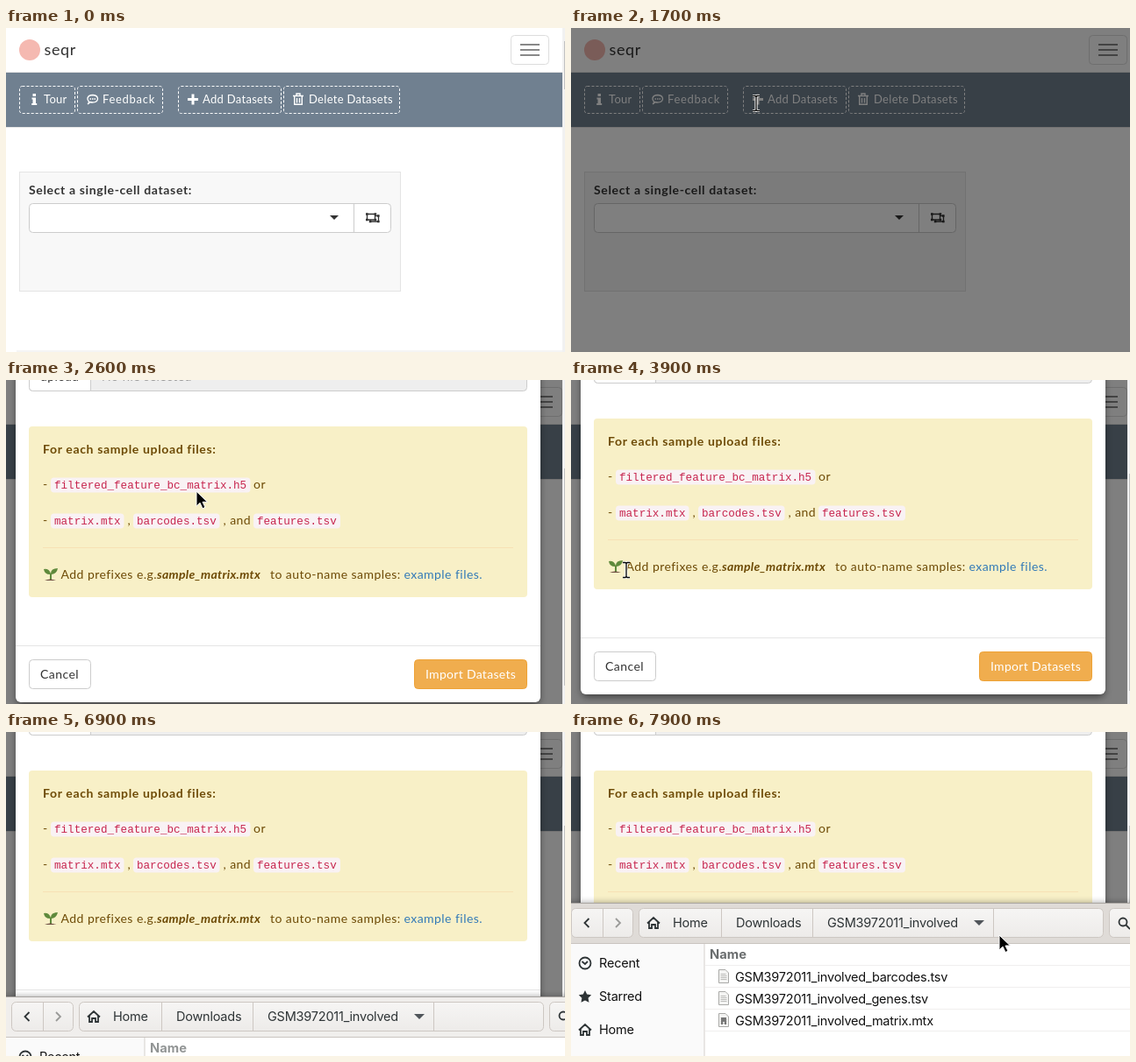
An HTML page for the animation above (8 s loop, 637x370 px).

```html
<!DOCTYPE html>
<html lang="en">
<head>
<meta charset="utf-8">
<title>Dataset upload</title>
<style>
  html, body { margin: 0; width: 100%; height: 100%; overflow: hidden; background: #fff; }
  svg { display: block; width: 637px; height: 370px; }
  text { font: 14px Lato, sans-serif; letter-spacing: .45px; fill: #333; white-space: pre; }
  .nav text { font-size: 13px; letter-spacing: .3px; fill: #fff; }
  .nav rect { fill: none; stroke: #fff; stroke-dasharray: 3 2; }
  .nav .ico { fill: #fff; }
  .line { fill: none; stroke: #fff; stroke-width: 1.4; }
  .ink { fill: none; stroke: #2e3436; stroke-width: 1.8; }
  text.big { font-size: 18px; letter-spacing: .65px; }
  text.bold { font-weight: 700; letter-spacing: .65px; }
  .box { fill: #fff; stroke: #ccc; }
  .note text { fill: #6d4a05; }
  .note .code { fill: #c7254e; font: 12.6px "Liberation Mono", monospace; letter-spacing: 0; }
  .note .tag { fill: #f9f2f4; }
  .note .link { fill: #337ab7; }
  #prefix text { fill: inherit; }
  #prefix .em { font-weight: 700; font-style: italic; letter-spacing: .3px; }
  .win text { font: 14.5px Inter, sans-serif; letter-spacing: -.22px; fill: #2e3436; }
  .win .files text { fill: #111; }
  .win text.col { font-weight: 700; font-size: 14.7px; letter-spacing: 0; }
  .win .btn { fill: url(#head); stroke: #cdc7c2; }
  .ptr path { stroke-linejoin: round; }
</style>
</head>
<body>
<svg viewBox="0 0 637 370">
  <defs>
    <linearGradient id="head" x1="0" y1="0" x2="0" y2="1">
      <stop offset="0" stop-color="#f6f5f4"/><stop offset="1" stop-color="#edebe9"/>
    </linearGradient>
    <filter id="soft" x="-10%" y="-10%" width="120%" height="120%">
      <feGaussianBlur stdDeviation="4"/>
    </filter>
    <clipPath id="sel"><rect id="selClip" x="63" y="332" width="0" height="20"/></clipPath>
    <g id="prefix">
      <text x="62.500" y="347">Add prefixes e.g.</text>
      <text class="em" x="172" y="347">sample_matrix.mtx</text>
      <text x="301" y="347">to auto-name samples:</text>
    </g>
    <g id="sheet">
      <path d="M.5 .500H8l3.500 3.500V15.500H.5z" fill="#f4f4f3" stroke="#a9a9a7"/>
      <path d="M2.500 5.500h6M2.500 7.500h7M2.500 9.500h7M2.500 11.500h7" stroke="#bcbcba"/>
    </g>
    <path id="house" class="ink" d="M-7 .5L0-6 7 .5M-5-1V6H-2V2H2V6H5V-1"/>
  </defs>

  <!-- page -->
  <rect width="637" height="370" fill="#fff"/>
  <circle cx="27" cy="25" r="12" fill="#f5b9b1"/>
  <text class="big" x="43.500" y="31">seqr</text>
  <g id="menu">
    <rect x="575.500" y="8.500" width="43" height="33" rx="4" fill="#fff" stroke="#ddd"/>
    <path d="M586 19h22M586 25h22M586 31h22" stroke="#888" stroke-width="2"/>
  </g>
  <path d="M0 50.500H637" stroke="#e7e7e7"/>
  <rect y="51" width="637" height="62" fill="#708090"/>
  <path d="M0 113.500H637" stroke="#e7e7e7"/>
  <g class="nav">
    <rect id="hover" x="196.500" y="66.500" width="117" height="31" rx="3" style="fill:#fff;fill-opacity:.15;stroke:none"/>
    <rect x="15.500" y="66.500" width="63" height="31" rx="3"/>
    <rect x="81.500" y="66.500" width="97" height="31" rx="3"/>
    <rect x="196.500" y="66.500" width="117" height="31" rx="3"/>
    <rect x="316.500" y="66.500" width="132" height="31" rx="3"/>
    <path class="ico" d="M30.500 75h3.500v3h-3.500zM29.500 79.500H34V86h1.200v2h-6v-2h1.300v-4.500h-1zM211.500 75.500h3v4.500h4.500v3h-4.500v4.500h-3V83H207v-3h4.500z"/>
    <path class="line" d="M93 87q2-1.500 1.500-3-2-2-1.500-4 1-3.500 6-3.500 5.500.5 5.500 4.500-.5 4-6 4-1.500 0-2.500-.5-1.500 1.500-3 2.500zM95.500 81h1.500m1 0h1.500m1 0h1.500"/>
    <path class="line" d="M327 77.500h12M331 77v-2h4v2M328.700 78v9.300h8.600V78M331.500 80v5.500M334.500 80v5.500"/>
    <text x="43" y="86">Tour</text>
    <text x="110" y="86" style="letter-spacing:.7px">Feedback</text>
    <text x="224" y="86">Add Datasets</text>
    <text x="345" y="86">Delete Datasets</text>
  </g>
  <rect x="15.500" y="164.500" width="434" height="136" fill="#f8f8f8" stroke="#e4e4e4"/>
  <text class="bold" x="26" y="190">Select a single-cell dataset:</text>
  <rect class="box" x="26.500" y="200.500" width="412" height="33" rx="4"/>
  <path d="M396.500 200V234" stroke="#ccc"/>
  <path d="M369 214h10l-5 5z" fill="#333"/>
  <g fill="none" stroke="#333" stroke-width="1.300">
    <path d="M411.500 212.500h9v6.500h-9zM421 214.500h3.500v6.500H415v-2"/>
    <path stroke-width="2.600" d="M410 212.500h2.600m7 0h2.600M410 219h2.600m7 0h2.600M423 214.500h2.600M423 221h2.600m-11.800 0h2.600"/>
  </g>
  <rect id="foot" x="12" y="368" width="622" height="2" fill="#f5f5f5"/>
  <g id="pageBar">
    <rect x="634" width="3" height="370" fill="#f1f1f1"/>
    <rect x="636" y="15" width="1" height="55" fill="#c1c1c1"/>
  </g>
  <rect id="dim" width="637" height="370" opacity="0"/>

  <!-- dialog -->
  <g id="modal">
    <rect x="12" y="8" width="596" height="483" rx="6" opacity=".5" filter="url(#soft)"/>
    <rect x="11" y="3" width="598" height="485" rx="6" fill="#fff"/>
    <text class="big" x="26" y="37">Upload Single Cell Datasets</text>
    <path d="M11 58.500H609M11 423.500H609" stroke="#e5e5e5"/>
    <text class="bold" x="26" y="89">Click upload or drag files:</text>
    <rect x="26.500" y="99.500" width="567" height="33" rx="4" fill="#eee" stroke="#ccc"/>
    <path d="M96.500 99.500H30.500a4 4 0 0 0-4 4v25a4 4 0 0 0 4 4h66z" class="box"/>
    <text x="39" y="121">upload</text>
    <text x="109" y="121" style="fill:#999">No file selected</text>
    <g class="note">
      <rect x="26" y="173" width="568" height="195" rx="4" fill="#f8f0c7"/>
      <text class="bold" x="42" y="204">For each sample upload files:</text>
      <rect class="tag" x="51" y="231.500" width="227.500" height="17" rx="4"/>
      <rect class="tag" x="51" y="272.500" width="83.500" height="17" rx="4"/>
      <rect class="tag" x="145" y="272.500" width="98.500" height="17" rx="4"/>
      <rect class="tag" x="282" y="272.500" width="99" height="17" rx="4"/>
      <text x="42" y="244">-</text>
      <text class="code" x="55" y="244">filtered_feature_bc_matrix.h5</text>
      <text x="282" y="244">or</text>
      <text x="42" y="285">-</text>
      <text class="code" x="55" y="285">matrix.mtx</text>
      <text x="138.500" y="285">,</text>
      <text class="code" x="149" y="285">barcodes.tsv</text>
      <text x="247.500" y="285">, and</text>
      <text class="code" x="286" y="285">features.tsv</text>
      <path d="M42 311.500H578" stroke="#f7e1b5"/>
      <path d="M43 336q6-1 8 5 0-6 8-6-1 6-7 7v6h-2v-6q-6 0-7-6z" fill="#5f8a3c"/>
      <path d="M44 349q6-3 13 0z" fill="#6d4c41"/>
      <use href="#prefix" fill="#6d4a05"/>
      <text class="link" x="453.500" y="347">example files.</text>
      <g clip-path="url(#sel)">
        <rect x="63" y="332" width="400" height="20" fill="#308cf0"/>
        <use href="#prefix" fill="#fff"/>
      </g>
    </g>
    <rect class="box" x="26.500" y="439.500" width="70" height="33" rx="4"/>
    <text x="39" y="461">Cancel</text>
    <rect x="465.500" y="439.500" width="128" height="33" rx="4" fill="#f0ad4e" stroke="#eea236"/>
    <text x="478" y="461" style="fill:#fff;letter-spacing:.3px">Import Datasets</text>
  </g>
  <g id="modalBar">
    <rect x="634" width="3" height="370" fill="#f1f1f1"/>
    <rect id="thumb" x="636" width="1" height="248" fill="#c1c1c1"/>
  </g>

  <!-- file window, drawn from its top left corner -->
  <g class="win" id="win">
    <rect x="-40" y="1" width="760" height="400" opacity=".45" filter="url(#soft)"/>
    <rect x="-40" width="760" height="400" fill="#fff"/>
    <rect id="bar" x="-40" width="760" height="46"/>
    <path d="M-40 .5H720" stroke="#aaa6a2"/>
    <path d="M-40 46.500H720" stroke="#c9c4bf"/>
    <rect class="btn" x=".5" y="6.500" width="70" height="33" rx="5"/>
    <rect class="btn" x="77.500" y="6.500" width="529" height="33" rx="5"/>
    <path d="M36.500 7v32M171.500 7v32M275.500 7v32M481.500 7v32" stroke="#cdc7c2"/>
    <rect class="btn" x="613.500" y="6.500" width="50" height="33" rx="5"/>
    <path class="ink" d="M20.500 18l-5 5 5 5"/>
    <path class="ink" d="M51 18l5 5-5 5" style="stroke:#9a9a98"/>
    <use href="#house" x="94" y="23"/>
    <text x="116" y="28">Home</text>
    <text x="188" y="28">Downloads</text>
    <text x="292" y="28">GSM3972011_involved</text>
    <path d="M459 20h12l-6 6z" fill="#50555a"/>
    <circle class="ink" cx="629" cy="22" r="4.500"/><path class="ink" d="M632 25l5 5"/>
    <rect x="-40" y="47" width="192" height="360" fill="#fafafa"/>
    <path d="M152 47V400" stroke="#d5d0cc"/>
    <circle class="ink" cx="16" cy="69" r="6.500"/><path class="ink" d="M12.500 67l3.500 3 3-3"/>
    <path d="M16 100l2.200 4.600 5 .7-3.600 3.500.9 5-4.500-2.400-4.500 2.400.9-5-3.600-3.500 5-.7z" fill="#2e3436"/>
    <use href="#house" x="16" y="145"/>
    <g class="files">
      <text x="32" y="74">Recent</text>
      <text x="32" y="112">Starred</text>
      <text x="32" y="150">Home</text>
      <path d="M153 71.500H720M153 96.500H720M153 121.500H720M153 146.500H720" stroke="#f0efee"/>
      <use href="#sheet" x="168" y="76"/>
      <use href="#sheet" x="168" y="101"/>
      <use href="#sheet" x="168" y="126"/>
      <path d="M171 131h6v8h-2v-3h-2v3h-2z" fill="#777"/>
      <text x="187" y="90">GSM3972011_involved_barcodes.tsv</text>
      <text x="187" y="115">GSM3972011_involved_genes.tsv</text>
      <text x="187" y="140">GSM3972011_involved_matrix.mtx</text>
    </g>
    <text class="col" id="col" x="158" y="64">Name</text>
  </g>

  <g class="ptr" id="ptr">
    <path id="arrow" d="M0 0V17l4-4 3 6.500 3-1.400-3-6.100h5.500z" stroke="#fff"/>
    <path id="hand" d="M-1 0q2-2 3 0v6q5-1 8 2v5l-2 5H1l-6-8q1-2 4 0z" fill="#fff" stroke="#000"/>
    <g id="beam" fill="none">
      <path d="M-4-8.500h3l1 1 1-1h3M-4 8.500h3l1-1 1 1h3M0-8V8" stroke="#fff" stroke-width="3.200"/>
      <path d="M-4-8.500h3l1 1 1-1h3M-4 8.500h3l1-1 1 1h3M0-8V8" stroke="#000" stroke-width="1.300"/>
    </g>
  </g>
</svg>
<script>
const LOOP = 8000, STEP = 100;
const DIM = 1500, PRESS = 4000, RELEASE = 5600, FOCUS = 7300;
const $ = id => document.getElementById(id);
const show = (id, on) => { $(id).style.display = on ? '' : 'none'; };
const set = (id, name, value) => $(id).setAttribute(name, value);
const move = (id, x, y) => set(id, 'transform', `translate(${x} ${y})`);

// Keys are [time, ...values]; values run straight from key to key.
function at(t, keys) {
  if (t <= keys[0][0]) return keys[0].slice(1);
  for (let i = 1; i < keys.length; i++) {
    const [t1, ...b] = keys[i], [t0, ...a] = keys[i - 1];
    if (t <= t1) return a.map((v, k) => v + (b[k] - v) * (t - t0) / (t1 - t0));
  }
  return keys[keys.length - 1].slice(1);
}

const pointer = [
  [0, 103, -24], [100, 103, 0], [900, 211, 86],
  [2300, 211, 86], [2700, 219, 141], [3600, 71, 217], [3900, 63, 217],
  [PRESS, 63, 217], [4500, 341, 215], [4800, 415, 215], [5400, 448, 215],
  [RELEASE, 448, 215], [6200, 636, 235], [6300, 660, 236],
  [7500, 660, 236], [7600, 488, 238], [7900, 488, 232]
];
const scrollKeys = [[2100, 0], [2200, 7], [2500, 118], [2700, 136]];
const slideKeys = [[1700, -126], [1800, -46], [1900, -12], [2000, 0]];
const winKeys = [[6300, 14, 385], [6400, 12, 368], [6900, 6, 302], [7200, 2, 225], [7500, 0, 202], [7900, 0, 195]];

function pointerShape(t, overButton) {
  if (overButton) return 'hand';
  if (t >= DIM && t < 1900 || t >= 3200 && t < 5900) return 'beam';
  return 'arrow';
}

function draw(t) {
  const [x, y] = at(t, pointer);
  const [scroll] = at(t, scrollKeys);
  const open = t >= DIM;
  const overButton = !open && x > 196 && y > 66;

  show('hover', overButton);
  move('menu', open ? 15 : 0, 0);
  show('pageBar', !open);
  show('foot', !open);
  set('dim', 'opacity', at(t, [[DIM, 0], [1700, .5]])[0]);

  move('modal', 0, 7 - scroll + at(t, slideKeys)[0]);
  set('modal', 'opacity', at(t, [[1700, 0], [1850, 1]])[0]);
  show('modalBar', t >= 1800);
  set('thumb', 'y', 15 + scroll * 92 / 136);
  set('thumb', 'fill', t >= 6200 && t < 6300 ? '#a8a8a8' : '#c1c1c1');

  // The highlight trails the pointer by one step.
  const end = t > PRESS && t < RELEASE ? at(t - STEP, pointer)[0] : 63;
  set('selClip', 'width', Math.max(0, end - 63));

  show('win', t >= 6400);
  move('win', ...at(t, winKeys));
  set('bar', 'fill', t < FOCUS ? '#f0eeec' : '#dfdbd7');
  $('col').style.fill = t < FOCUS ? '#929595' : '#6a6d6e';

  const shape = pointerShape(t, overButton);
  for (const id of ['arrow', 'hand', 'beam']) show(id, id === shape);
  move('ptr', x, y);
}

function frame() {
  draw(Math.floor(performance.now() % LOOP / STEP) * STEP);
  requestAnimationFrame(frame);
}
frame();
</script>
</body>
</html>
```
